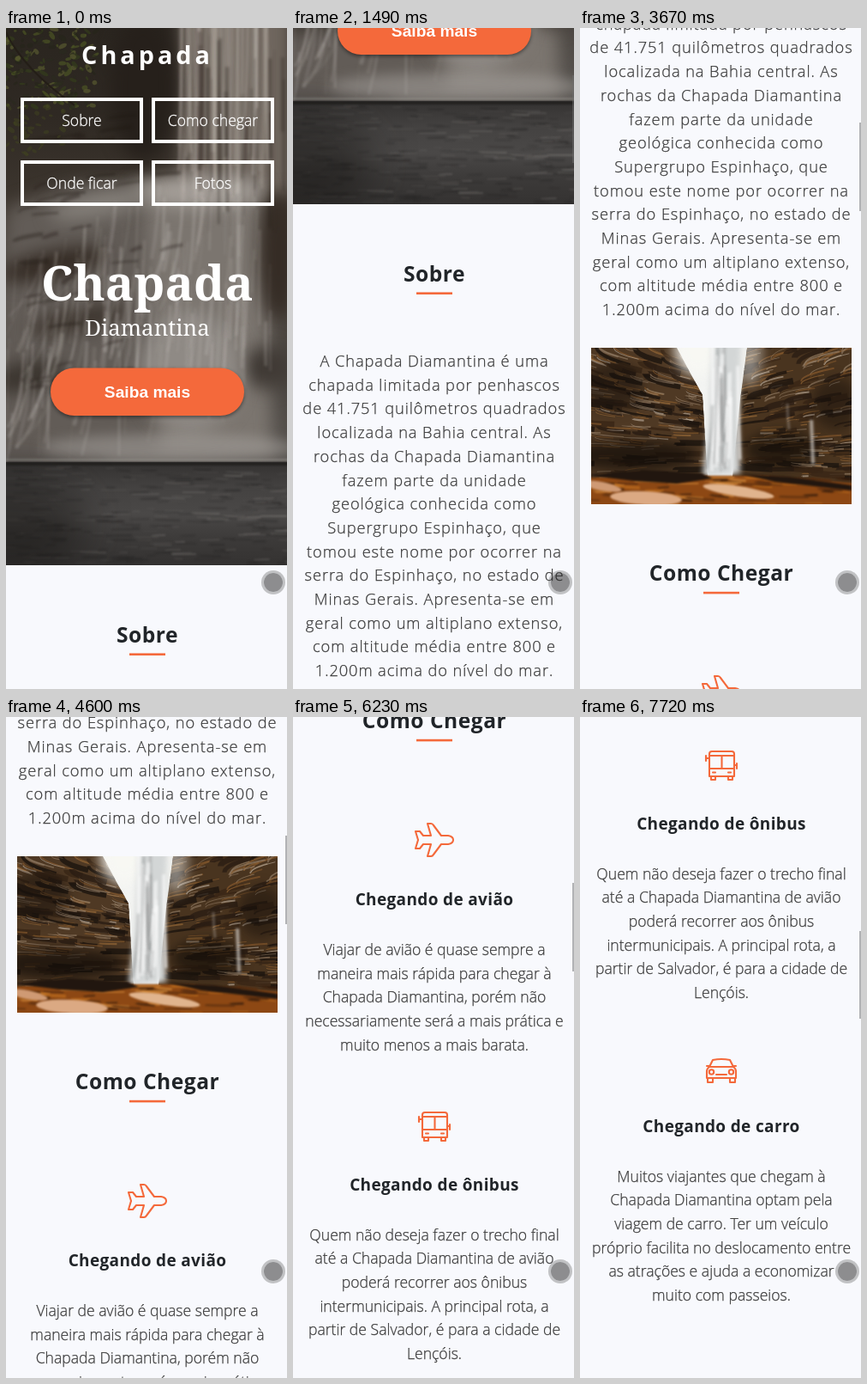
An HTML page with a canvas that plays this animation: 328 by 769 pixels, repeating every 8000 ms.

```html
<!DOCTYPE html>
<html lang="pt-BR">
<head>
<meta charset="utf-8">
<title>Chapada Diamantina</title>
<style>
html, body { margin: 0; width: 100%; height: 100%; overflow: hidden; background: #f8f9fd; }
#stage { position: relative; width: 328px; height: 769px; overflow: hidden; background: #f8f9fd; }
#page { position: absolute; left: 0; top: 0; width: 330px; height: 2700px; }
#page > * { position: absolute; left: 0; top: 0; }
#page #photo { left: 13px; top: 1212px; }
#bar { position: absolute; left: 326px; width: 2px; height: 102.5px; background: rgba(110,110,110,.5); }
#touch { position: absolute; left: 298px; top: 631px; width: 22px; height: 22px; border-radius: 50%;
  border: 3px solid rgba(80,80,80,.32); background: rgba(35,35,35,.5); background-clip: padding-box; }
text { font-family: "Open Sans", sans-serif; text-anchor: middle; fill: #212529; }
.brand { font-size: 28.8px; font-weight: 700; letter-spacing: 4px; fill: #fff; }
.nav { font-size: 17.6px; font-weight: 300; fill: #fff; stroke: #fff; stroke-width: .3px; }
.title { font: 700 56px "Noto Serif", serif; fill: #fff; }
.sub { font: 400 25.8px "Noto Serif", serif; fill: #fff; }
.button { font: 700 19.2px "Liberation Sans", Arial, sans-serif; fill: #fff; }
.h2 { font-size: 24.6px; font-weight: 700; letter-spacing: .5px; }
.h3 { font-size: 19px; font-weight: 700; letter-spacing: .35px; }
.lead, .body { font-weight: 300; fill: #3a3a3a; stroke: #3a3a3a; stroke-width: .25px; }
.lead { font-size: 18.3px; letter-spacing: .9px; }
.body { font-size: 17.6px; }
.icon { fill: none; stroke: #f4693b; stroke-width: 2.1; stroke-linecap: round; stroke-linejoin: round; }
</style>
</head>
<body>
<div id="stage">
  <div id="page">
    <canvas id="hero" width="330" height="625"></canvas>
    <canvas id="photo" width="304" height="182"></canvas>
    <svg id="art" width="330" height="2700">
      <g fill="none" stroke="#fff" stroke-width="4">
        <rect x="19" y="83" width="139" height="49"/><rect x="172" y="83" width="139" height="49"/>
        <rect x="19" y="156" width="139" height="49"/><rect x="172" y="156" width="139" height="49"/>
      </g>
      <rect x="52" y="395.5" width="226" height="55.5" rx="27.7" fill="#f4693b"
        style="filter:drop-shadow(0 2px 2px rgba(0,0,0,.45))"/>
      <g fill="#f4693b">
        <rect x="144" y="727.4" width="42" height="2.6"/>
        <rect x="144" y="1495.8" width="42" height="2.6"/>
      </g>
      <g class="icon">
        <path d="M157 1594h4q2 0 3 2l9 12h8q6 1 6 5t-6 5h-8l-9 12q-1 2-3 2h-4l4-14h-9l-4 5h-5l3-10l-3-10h5l4 5h9z"/>
        <path d="M154 1930h23q3 0 3 3v26h-29v-26q0-3 3-3zM151 1935h29M151 1950h29M165.500 1935v15M155 1954.500h3M173 1954.500h3
          M153 1959v4h5v-4M173 1959v4h5v-4M151 1938h-4v-3v6M180 1946h3v-2v6"/>
        <path d="M151 2297l4-8q10-2 20 0l4 8q3 2 3 5v8h-34v-8q0-3 3-5zM151 2297h28M148 2296h3M179 2296h3M159 2306h12
          M149 2310v5h6v-5M175 2310v5h6v-5"/>
        <circle cx="153.500" cy="2303" r="2.700"/><circle cx="176.500" cy="2303" r="2.700"/>
      </g>
    </svg>
  </div>
  <div id="bar"></div>
  <div id="touch"></div>
</div>
<script>
const $ = id => document.getElementById(id);
const MID = 165, LINE = 27.7;

function write(kind, y, text, x = MID) {
  text.split('|').forEach((line, i) => {
    const el = document.createElementNS('http://www.w3.org/2000/svg', 'text');
    el.setAttribute('class', kind);
    el.setAttribute('x', x);
    el.setAttribute('y', y + i * LINE);
    el.textContent = line;
    $('art').append(el);
  });
}

write('brand', 42, 'Chapada');
write('nav', 114, 'Sobre', 88.5);
write('nav', 114, 'Como chegar', 241.5);
write('nav', 187, 'Onde ficar', 88.5);
write('nav', 187, 'Fotos', 241.5);
write('title', 317, 'Chapada');
write('sub', 358, 'Diamantina');
write('button', 430, 'Saiba mais');
write('h2', 715, 'Sobre');
write('lead', 814, 'A Chapada Diamantina é uma|chapada limitada por penhascos|' +
  'de 41.751 quilômetros quadrados|localizada na Bahia central. As|rochas da Chapada Diamantina|' +
  'fazem parte da unidade|geológica conhecida como|Supergrupo Espinhaço, que|' +
  'tomou este nome por ocorrer na|serra do Espinhaço, no estado de|Minas Gerais. Apresenta-se em|' +
  'geral como um altiplano extenso,|com altitude média entre 800 e|1.200m acima do nível do mar.');
write('h2', 1483, 'Como Chegar');
write('h3', 1689, 'Chegando de avião');
write('body', 1747, 'Viajar de avião é quase sempre a|maneira mais rápida para chegar à|' +
  'Chapada Diamantina, porém não|necessariamente será a mais prática e|muito menos a mais barata.');
write('h3', 2021, 'Chegando de ônibus');
write('body', 2078.5, 'Quem não deseja fazer o trecho final|até a Chapada Diamantina de avião|' +
  'poderá recorrer aos ônibus|intermunicipais. A principal rota, a|partir de Salvador, é para a cidade de|Lençóis.');
write('h3', 2373, 'Chegando de carro');
write('body', 2430.5, 'Muitos viajantes que chegam à|Chapada Diamantina optam pela|' +
  'viagem de carro. Ter um veículo|próprio facilita no deslocamento entre|' +
  'as atrações e ajuda a economizar|muito com passeios.');

function seeded(s) {
  return (a = 0, b = 1) => {
    s = (s * 16807) % 2147483647;
    return a + (b - a) * s / 2147483647;
  };
}

function painter(id) {
  const c = $(id).getContext('2d');
  return {
    c,
    blur(n) { c.filter = n ? `blur(${n}px)` : 'none'; },
    fill(color, x, y, w, h) { c.fillStyle = color; c.fillRect(x, y, w, h); },
    fade(stops, y0, y1, w) {
      const g = c.createLinearGradient(0, y0, 0, y1);
      stops.forEach((s, i) => g.addColorStop(i / (stops.length - 1), s));
      c.fillStyle = g;
      c.fillRect(0, y0, w, y1 - y0);
    },
    oval(color, x, y, rx, ry, turn = 0) {
      c.fillStyle = color;
      c.beginPath();
      c.ellipse(x, y, rx, ry, turn, 0, 7);
      c.fill();
    },
    path(...p) {
      c.beginPath();
      for (let i = 0; i < p.length; i += 2) c.lineTo(p[i], p[i + 1]);
    },
    shape(color, ...p) {
      this.path(...p);
      c.fillStyle = color;
      c.fill();
    },
    streak(color, width, x0, y0, x1, y1, bend = 0) {
      c.strokeStyle = color;
      c.lineWidth = width;
      c.beginPath();
      c.moveTo(x0, y0);
      c.quadraticCurveTo(x0 + bend, (y0 + y1) / 2, x1, y1);
      c.stroke();
    }
  };
}

function paintHero() {
  const p = painter('hero'), r = seeded(41);
  p.fade(['#2a251f', '#2f2923', '#3d362f', '#4d4741', '#4b4641', '#57534f'], 0, 505, 330);

  // soft masses of water and rock
  p.blur(10);
  p.fill('#6f665e', 204, -30, 130, 230);
  p.shape('#7b756f', 150, 180, 300, 175, 312, 500, 120, 500);
  p.shape('#625c57', 0, 210, 90, 180, 160, 180, 180, 500, -20, 500);
  p.oval('#26201b', 160, 70, 38, 85);
  p.oval('#a49e98', 225, 190, 75, 18);
  p.oval('#85807a', 110, 205, 60, 14, -.2);
  p.oval('#332a23', 55, 275, 65, 16, -.2);
  p.oval('#3a322b', 85, 340, 60, 13, -.2);
  p.oval('#3b352f', 25, 405, 45, 18, -.2);
  p.oval('#352c25', 318, 265, 22, 75);
  p.oval('#403a35', 305, 395, 30, 25);
  p.oval('#8f8a85', 215, 400, 60, 70);

  // falling water
  p.blur(1.6);
  for (let i = 0; i < 40; i++) {
    const x = i % 3 ? r(232, 305) : r(204, 226);
    p.streak(`rgba(215,208,200,${r(.08, .3)})`, r(1, 6), x, -5, x + r(-6, 5), r(130, 215));
  }
  for (let i = 0; i < 24; i++) {
    const x = r(222, 328);
    p.streak(`rgba(38,30,25,${r(.12, .35)})`, r(1, 5), x, r(0, 110), x, r(120, 240));
  }
  for (let i = 0; i < 150; i++) {
    const x = r(-5, 310), y = Math.max(180, 270 - x * .55) + r(0, 190);
    p.streak(`rgba(205,200,195,${r(.06, .24)})`, r(1, 5), x, y, x - (310 - x) * r(0, .14), y + r(45, 130), -1);
  }
  for (let i = 0; i < 45; i++) {
    const x = r(-10, 190), y = r(100, 440);
    p.streak('rgba(30,23,18,.32)', r(2, 6), x, y, x + r(12, 38), y - r(2, 10));
  }

  // foliage over the rock
  p.blur(.5);
  for (let i = 0; i < 190; i++) {
    const x = r(-5, 106), y = r(-5, 92);
    p.oval(['#4b5424', '#343d1c', '#585a30', '#26261a', '#2a2a1e'][i % 5] + 'b0', x, y, r(1, 6), r(1, 3), r(-1, 1));
  }
  for (let i = 0; i < 40; i++) p.oval('#3f411f88', r(0, 70), r(90, 150), r(2, 5), r(1, 3), r(-1, 1));
  p.streak('#241e17', 2, 0, 5, 80, 90, 20);

  // pool
  p.blur(7);
  p.oval('rgba(170,165,161,.5)', 190, 488, 150, 16);
  p.blur(0);
  p.fade(['#343231', '#444241', '#4a4847', '#3c3a39', '#343231'], 505, 625, 330);
  p.blur(1);
  p.fill('rgba(150,146,142,.5)', 0, 501, 330, 3);
  p.fill('rgba(30,28,27,.75)', 0, 505, 330, 4);
  for (let i = 0; i < 260; i++) {
    const x = r(-10, 330), y = r(510, 624), light = r() < .5;
    p.streak(light ? `rgba(150,146,142,${r(.08, .14 + x / 900)})` : 'rgba(20,18,18,.26)',
      r(.7, 2.2), x, y, x + r(8, 34), y + r(-1, 1));
  }
  p.blur(25);
  p.oval('rgba(22,20,19,.5)', 5, 580, 90, 60);
}

function paintPhoto() {
  const p = painter('photo'), r = seeded(77), c = p.c;
  const dark = ['#1d150f', '#2b1e14', '#3a2717'], lit = ['#a9743c', '#8a5c2e', '#c9bcab', '#98826a'];
  p.fill('#f3f4f2', 0, 0, 304, 182);

  // layered rock: broad dark slabs with thin lit edges
  function wall(base, x0, x1, slope, ...outline) {
    c.save();
    p.path(...outline);
    c.clip();
    p.fill(base, 0, 0, 304, 182);
    p.blur(.7);
    for (let i = 0; i < 170; i++) {
      const x = r(x0, x1), y = r(-8, 152), len = r(10, 42), edge = i % 2;
      const drop = len * slope * (1 - y / 125) + r(-3, 3);
      p.streak(edge ? lit[i % 4] + 'a8' : dark[i % 3] + 'd0', edge ? r(.6, 2) : r(2, 8), x, y, x + len, y + drop);
      if (edge) p.streak(lit[(i >> 1) % 4] + '90', r(.6, 2.4), x, y + 3, x + len * .7, y + 3 + drop * .7);
    }
    c.restore();
  }
  wall('#4f3924', -30, 130, .5, 0, 0, 100, 0, 116, 30, 130, 55, 136, 155, 0, 160);
  wall('#49341f', 165, 300, -.55, 182, 0, 304, 0, 304, 172, 165, 150, 174, 60);

  p.blur(7);
  p.oval('rgba(20,14,10,.5)', 25, 45, 35, 28);
  p.oval('rgba(18,12,8,.7)', 50, 125, 75, 18);
  p.oval('rgba(18,12,8,.6)', 222, 118, 42, 22);
  p.oval('rgba(20,14,10,.45)', 285, 65, 28, 30);
  p.oval('rgba(248,248,244,.85)', 125, 0, 28, 32);
  p.oval('rgba(240,240,235,.5)', 185, 5, 14, 40);

  // waterfall
  p.blur(3);
  p.shape('#d3d6d6', 142, -5, 175, -5, 172, 90, 174, 146, 130, 150, 137, 90);
  p.blur(1.6);
  for (let i = 0; i < 30; i++) {
    const x = r(141, 173);
    p.streak(i % 3 ? 'rgba(255,255,255,.6)' : 'rgba(115,118,118,.4)', r(1, 4), x, r(-5, 80), x + r(-9, 3), r(95, 150));
  }
  p.streak('rgba(225,220,215,.65)', 4, 257, 84, 259, 135, 1);
  p.streak('rgba(225,220,215,.4)', 2, 229, 65, 231, 95);

  // river bed
  p.blur(1);
  p.shape('#8d4814', -5, 152, 60, 147, 130, 149, 200, 149, 310, 158, 310, 190, -5, 190);
  for (let i = 0; i < 60; i++) {
    const x = r(-15, 290), y = r(151, 181);
    p.streak(['#c0701faa', '#3b1f0ccc', '#d48a3aaa', '#5a2f10bb'][i % 4], r(1, 4), x, y, x + r(12, 38), y + r(-1, 4));
  }
  p.shape('#21160f', -5, 148, 60, 142, 128, 146, 142, 152, 100, 158, 50, 155);
  p.shape('#21160f', 175, 147, 230, 150, 304, 160, 304, 166, 215, 156);
  p.oval('#dba983', 64, 175, 42, 8, .05);
  p.oval('#cf9a74', 12, 161, 24, 5, .2);
  p.oval('#e0b48e', 172, 167, 42, 6, .15);
}

paintHero();
paintPhoto();

const LOOP = 8000, STEP = 210;
const jumps = [500, 1490, 2580, 3670, 4600, 5530, 6230, 7010, 7720];
const fades = [[400, 1], [470, .6], [550, .3]];
const start = performance.now();

function frame() {
  const t = (performance.now() - start) % LOOP;
  const n = jumps.filter(j => t >= j).length;
  const age = n ? t - jumps[n - 1] : Infinity;
  const fade = fades.find(f => age < f[0]);
  $('page').style.transform = `translateY(${-n * STEP}px)`;
  $('bar').style.top = n * 27.7 - .5 + 'px';
  $('bar').style.opacity = fade ? fade[1] : 0;
  requestAnimationFrame(frame);
}
frame();
</script>
</body>
</html>
```
